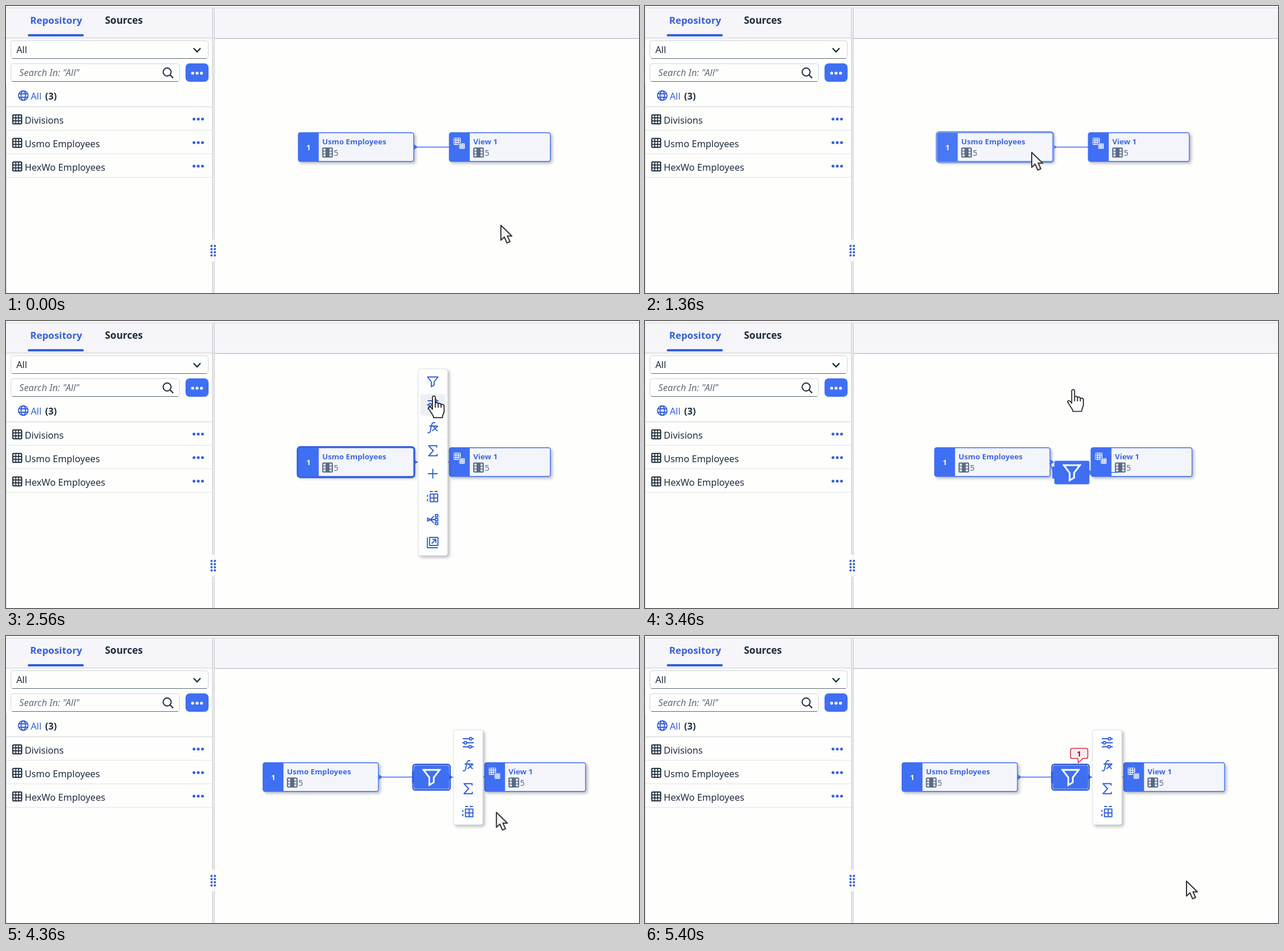
Recreate the animation shown at these times as an HTML page. Size 1100 by 500 pixels, loop 7230 ms.

```html
<!DOCTYPE html>
<html lang="en">
<head>
<meta charset="utf-8">
<title>Data flow editor</title>
<style>
  html, body { margin: 0; width: 100%; height: 100%; overflow: hidden; background: #fefefd; }
  svg { display: block; font-family: "Noto Sans", "Open Sans", sans-serif; font-size: 16.2px; }
  .b { font-weight: 700; }
  .line { fill: none; stroke: #3560d8; stroke-width: 1.9; stroke-linejoin: round; }
  .shade { filter: drop-shadow(3px 3px 2.5px rgba(70, 75, 90, .36)); }
</style>
</head>
<body>
<svg id="stage" width="1100" height="500" viewBox="0 0 1100 500"></svg>
<script>
const LOOP = 7230;
const BLUE = '#3f6ff3', INK = '#1d2d3e', LINK = '#3560d8', SLATE = '#586a85';

// ---- drawing helpers ----
const rect = (x, y, w, h, fill, rest = '') =>
  `<rect x="${x}" y="${y}" width="${w}" height="${h}" fill="${fill}" ${rest}/>`;
const text = (x, y, s, fill, rest = '') => `<text x="${x}" y="${y}" fill="${fill}" ${rest}>${s}</text>`;
const path = (d, rest = 'class="line"') => `<path d="${d}" ${rest}/>`;
const group = (id, body, rest = '') => `<g id="${id}" ${rest}>${body}</g>`;
const dots = (x, y, gap, r, fill) =>
  [0, 1, 2].map(i => `<circle cx="${x + i * gap}" cy="${y}" r="${r}" fill="${fill}"/>`).join('');

const FUNNEL = 'M-9 -8.5H9L2.5 0V5.5L-2.5 8.5V0Z';
const ICONS = {
  filter: path(FUNNEL),
  sliders: path('M-9 -7H2M7 -7H10M-10 0H-7M-2 0H10M-9 7H1M6 7H10') +
    [[4.5, -7], [-4.5, 0], [3.5, 7]].map(([x, y]) => `<circle cx="${x}" cy="${y}" r="2.3" class="line"/>`).join(''),
  fx: path('M4 -8.5C0 -10 -1.5 -7.5 -2.2 -4L-4.3 6C-4.8 8.6 -6.5 9.3 -9 8.5M-6 -3H8M0 -3C4 -3 4 5.5 8.5 5M9 -3L-1 5.5'),
  sum: path('M7 -5.5V-8.7H-7L1 0L-7 8.7H7.5V5.5'),
  plus: path('M-8.5 0H8.5M0 -8.5V8.5'),
  pivot: path('M-4.5 -4.5H8.5V8.8H-4.5ZM2 -4.5V8.8M-4.5 2.2H8.5M-5 -9H0M3 -9H8.5M-9 -3V0.5M-9 4V8'),
  tree: path('M-9 -2.8L-4.5 0L-9 2.8ZM-4 0H4M2 -6L-4 0L2 6M4.5 -8.8H8.8V-4.8H4.5ZM4.5 -2H8.8V2H4.5ZM4.5 4.8H8.8V8.8H4.5Z'),
  open: path('M-9.3 -9V9H9M-5.5 -9H9V5H-5.5ZM-2 2L5 -5.3M-0.5 -5.5H5.3V0.5')
};

function toolbar(id, x, y, names) {
  const items = names.map((n, i) =>
    rect(x + 3.5, y + 4 + i * 40, 43.5, 37.5, '#edf0f3', `rx="3" class="hl" opacity="0"`) +
    `<g transform="translate(${x + 25.3} ${y + 22.7 + i * 40})">${ICONS[n]}</g>`).join('');
  return group(id, rect(x, y, 51, names.length * 40 + 5.5, '#fefefe', 'rx="4" stroke="#dfe0e4" class="shade"') + items);
}

const film = (x, y) => rect(x, y, 18.5, 17.5, SLATE, 'rx="2"') +
  [2, 12.7].map(dx => [2, 7, 12].map(dy => rect(x + dx, y + dy, 3.8, 3.6, '#eef0f5')).join('')).join('');

// Cards are drawn relative to their left edge.
function card(id, w, title, badge) {
  return group(id,
    rect(0, 220.8, w, 50, '#f4f5fa', `rx="3.5" stroke="${BLUE}" stroke-width="1.4" class="shade"`) +
    path('M35.5 220.8H4A4 4 0 0 0 0 224.8V266.8A4 4 0 0 0 4 270.8H35.5Z', `fill="${BLUE}" class="tab"`) +
    badge + text(41.5, 241, title, '#3c68e6', 'class="b" font-size="13.2"') +
    film(41.5, 246.5) + text(61.5, 261, 5, '#586a80', 'font-size="14"'));
}

const tile = (x, y, n) => rect(x, y, n, n, '#fff', `rx="2" stroke="${BLUE}" stroke-width="1.2"`) +
  [0, 1, 2].map(i => [0, 1, 2].map(j => {
    const s = n / 3 - 2;
    return rect(x + 1.4 + i * (n - 2) / 3, y + 1.4 + j * (n - 2) / 3, s, s, BLUE);
  }).join('')).join('');

const gridIcon = y => rect(11.8, y, 15.4, 15.6, 'none', `rx="1.5" stroke="${INK}" stroke-width="2"`) +
  path(`M17 ${y}V${y + 15.6}M22 ${y}V${y + 15.6}M12 ${y + 5.2}H27M12 ${y + 10.4}H27`,
    `stroke="${INK}" stroke-width="1.6"`);

const field = (y, w) => rect(8.5, y, w, 31, '#fefefd', 'rx="4" stroke="#cfd5da"') +
  path(`M11 ${y + 31}H${6 + w}`, 'stroke="#566b76" stroke-width="1.2"');

// ---- side panel and canvas header ----
const panel =
  rect(0, 3, 1100, 53, '#f5f5fa') + rect(0, 2.5, 1100, 1.2, '#d9d9db') +
  rect(362, 56, 738, 1, '#a6aebc') +
  rect(0, 55, 358, 1.2, '#d4d5d8') + rect(0, 56.2, 358, 3, '#f6f6f6') +
  text(42, 31, 'Repository', LINK, 'class="b" font-size="16.8"') +
  text(172, 31, 'Sources', INK, 'class="b" font-size="17"') +
  rect(38, 49, 97, 4, LINK, 'rx="1.5"') +
  rect(0, 136, 1, 364, '#d9dadd') +
  rect(358, 3, 4.5, 497, '#ececef') + rect(358, 3, 1, 497, '#cfd0d4') + rect(361.3, 3, 1, 497, '#c6c8d0') +
  rect(358, 407, 4.5, 38, '#fafafb') +
  field(60.5, 343) + text(18, 82, 'All', INK) +
  path('M326 73.5L332 79.8L338 73.5', 'fill="none" stroke="#0f3038" stroke-width="2.2"') +
  field(100.5, 293) + text(23, 122, 'Search In: "All"', '#5f6c7c', 'font-style="italic"') +
  `<circle cx="280" cy="115" r="6.9" fill="none" stroke="${INK}" stroke-width="2"/>` +
  path('M285 120L290.5 125.5', `stroke="${INK}" stroke-width="2.2"`) +
  rect(312, 100, 40, 32, BLUE, 'rx="7"') + dots(324.3, 117, 7.7, 2.6, '#fff') +
  `<g transform="translate(30 156)"><circle r="8.3" class="line" stroke-width="1.6"/>` +
  `<ellipse rx="3.8" ry="8.3" class="line"/>` + path('M-8 -3H8M-8 3H8') + '</g>' +
  text(43, 163, 'All', LINK) + text(68, 163, '(3)', INK, 'class="b"') +
  rect(1, 175, 357, 1.2, '#d5d7d9') +
  ['Divisions', 'Usmo Employees', 'HexWo Employees'].map((name, i) => {
    const y = i * 41;
    return gridIcon(189.7 + y) + text(32.5, 205 + y, name, INK) +
      dots(326.7, 197 + y, 7.4, 2.5, LINK) + rect(1, 216 + y, 357, 1, '#e2e3e5');
  }).join('') +
  [357.2, 363].map(x => [0, 1, 2, 3].map(i =>
    `<circle cx="${x}" cy="${418 + i * 5.5}" r="2" fill="${LINK}"/>`).join('')).join('');

// ---- flow diagram ----
const port = (x, y) => path(`M${x} ${y - 4.7}L${x + 6.5} ${y}L${x} ${y + 4.7}Z`, `fill="${BLUE}"`);
const outline = (id, x, y, w, h) => rect(x, y, w, h, 'none', `id="${id}" rx="5"`);
const flow =
  path('M708 245.7H771', `id="link" stroke="${BLUE}" stroke-width="1.4"`) +
  path('', `id="linkIn" stroke="${BLUE}" stroke-width="1.4"`) +
  card('left', 200.5, 'Usmo Employees',
    text(17.7, 250.8, 1, '#fff', 'text-anchor="middle" font-size="13" font-weight="600"') +
    port(201, 245.7) + outline('ring', -1.3, 219.4, 203, 52.8)) +
  card('right', 175.5, 'View 1', tile(6.8, 229, 13.6) + tile(16.6, 238.6, 10.8)) +
  path('', `id="linkOut" stroke="${BLUE}" stroke-width="1.4"`) +
  group('node',
    rect(-34, -10.5, 5, 21, BLUE) + rect(-30.5, -20.6, 61, 41.2, BLUE, 'rx="3"') + port(30.5, 0) +
    path(FUNNEL, 'fill="none" stroke="#fff" stroke-width="1.9" transform="translate(0 .5) scale(1.55)"') +
    rect(-32.2, -22.2, 64.4, 44.4, 'none', 'id="nodeRing" rx="4" stroke="#315ad2" stroke-width="2.4"')) +
  toolbar('bar1', 716.3, 83.3, ['filter', 'sliders', 'fx', 'sum', 'plus', 'pivot', 'tree', 'open']) +
  toolbar('bar2', 777.6, 163.3, ['sliders', 'fx', 'sum', 'pivot']) +
  group('alert',
    path('M742.5 195.6H766.5Q769.5 195.6 769.5 198.6V210.4Q769.5 213.4 766.5 213.4H761L753 221L752 213.4H742.5Q739.5 213.4 739.5 210.4V198.6Q739.5 195.6 742.5 195.6Z',
      'fill="#fbe9ee" stroke="#c4182c" stroke-width="1.3"') +
    text(754.3, 209.6, 1, '#8f1322', 'class="b" font-size="13" text-anchor="middle"'));

const cursors =
  group('arrow', path('M1 1V27L7 21.5L11.5 31.8L16.8 29.5L12.3 19.7H20Z',
    'fill="#f5f5f5" stroke="#363636" stroke-width="2" stroke-linejoin="round"')) +
  group('hand', path('M-1.5 24V2.7C-1.5 0 3.5 0 3.5 2.7V14C3.5 11.5 8.5 11.5 8.5 15C8.5 12.5 13.5 13 13.5 16.5C13.5 14.5 18.8 15 18.8 18V27C18.8 31 15.8 33 15.8 38.5H.5C.5 34 -3 32 -4.5 28.5C-6 25 -9.5 23 -8.3 20.5C-6.5 18.5 -3 21 -1.5 24ZM3.5 14V21M8.5 15V21M13.5 16.5V21',
    'fill="#fefefe" stroke="#1e1e1e" stroke-width="1.7" stroke-linejoin="round"'));

document.getElementById('stage').innerHTML = panel + flow + cursors;

// ---- motion ----
const el = id => document.getElementById(id);
const show = (id, on) => { el(id).style.opacity = +on; };
const move = (id, x, y = 0) => el(id).setAttribute('transform', `translate(${x} ${y})`);
const clamp = u => Math.min(1, Math.max(0, u));
const ease = u => (1 - Math.cos(Math.PI * clamp(u))) / 2;
const mix = (a, b, u) => a + (b - a) * u;

// Pointer strokes: time, x, y; each one starts and ends at rest.
const STROKES = [
  [[200, 859, 381], [900, 729, 305], [1360, 671, 254]],
  [[1600, 671, 254], [2300, 722, 165], [2560, 742.5, 130], [2780, 743, 119]],
  [[3830, 743, 119], [4030, 745, 165], [4360, 851, 306], [4760, 919, 404], [5160, 940, 426]]
];

function pointer(t) {
  const s = STROKES.filter(k => t >= k[0][0]).pop() || STROKES[0];
  const end = s.length - 1;
  if (t <= s[0][0]) return s[0].slice(1);
  if (t >= s[end][0]) return s[end].slice(1);
  const i = s.findIndex(k => k[0] > t) - 1;
  const h = s[i + 1][0] - s[i][0], u = (t - s[i][0]) / h;
  const slope = (j, a) => j === 0 || j === end ? 0 : (s[j + 1][a] - s[j - 1][a]) / (s[j + 1][0] - s[j - 1][0]);
  return [1, 2].map(a => mix(s[i][a], s[i + 1][a], u * u * (3 - 2 * u)) +
    h * u * (1 - u) * (slope(i, a) * (1 - u) - slope(i + 1, a) * u));
}

const BARS = [
  { id: 'bar1', x: 716, y: 87, n: 8, from: 1640, to: 3380 },
  { id: 'bar2', x: 777, y: 167, n: 4, from: 3960, to: LOOP }
];
const isOpen = (bar, t) => t >= bar.from && t < bar.to;

function hovered(bar, t) {
  const [x, y] = pointer(t), i = Math.floor((y - bar.y) / 40);
  return isOpen(bar, t) && x > bar.x && x < bar.x + 51 && i >= 0 && i < bar.n ? i : -1;
}

function render(t) {
  const [x, y] = pointer(t);
  const s = ease((t - 3396) / 364), split = t >= 3396;

  const leftX = mix(508, 446.7, s), rightX = mix(770.4, 831.7, s);
  const nodeX = mix(742, 739.5, s), nodeY = mix(265.5, 246, s);
  move('left', leftX);
  move('right', rightX);
  move('node', nodeX, nodeY);
  show('link', !split);
  ['node', 'linkIn', 'linkOut'].forEach(id => show(id, split));
  el('linkIn').setAttribute('d', `M${leftX + 200} 245.7L${nodeX - 32} ${nodeY - .3}`);
  el('linkOut').setAttribute('d', `M${nodeX + 30} ${nodeY - .3}H${mix(821, 832, s)}`);

  const picked = t >= 1620 && t < 3390;
  const over = t < 1620 && x < 709 && y < 272;
  show('ring', picked || over);
  el('ring').setAttribute('stroke', picked ? '#3760da' : '#7899ee');
  el('ring').setAttribute('stroke-width', 3);
  el('left').querySelector('.tab').setAttribute('fill', over ? '#4a77f4' : BLUE);
  show('nodeRing', t >= 3930);

  let hand = t >= 3380 && t < 3850;
  for (const bar of BARS) {
    show(bar.id, isOpen(bar, t));
    hand = hand || hovered(bar, t) >= 0;
    const trail = [0, 30, 60, 90].map(d => hovered(bar, t - d));
    el(bar.id).querySelectorAll('.hl').forEach((r, i) =>
      r.setAttribute('opacity', trail.filter(k => k === i).length / 4));
  }

  show('alert', t >= 5400 ? 1 : t >= 5130 ? .6 : 0);
  show('hand', hand);
  show('arrow', !hand);
  move('hand', x, y);
  move('arrow', x, y);
}

const start = performance.now();
function tick() {
  render((performance.now() - start) % LOOP);
  requestAnimationFrame(tick);
}
tick();
</script>
</body>
</html>
```
